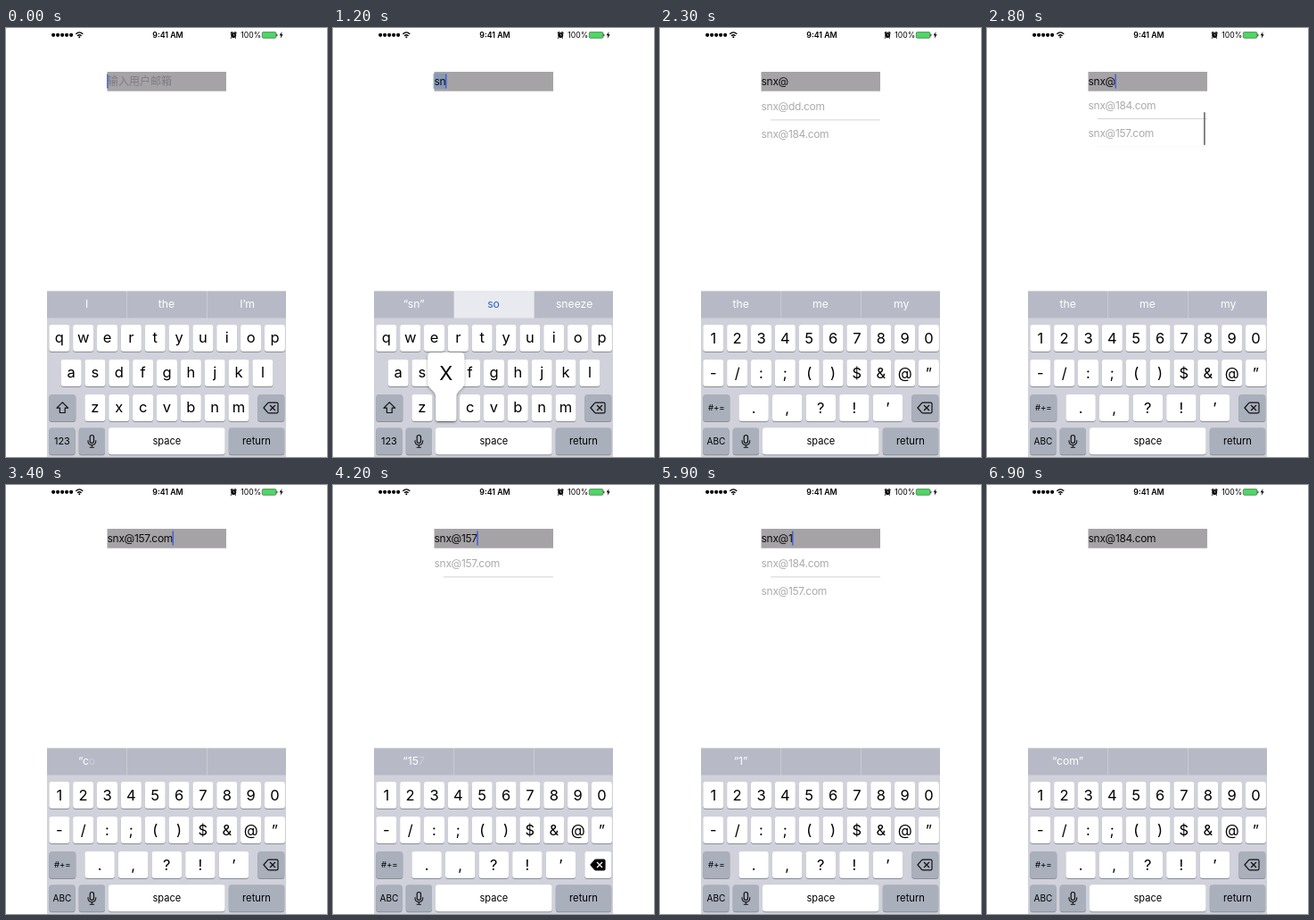
Animation of 360x480 px, one loop 7 s. Source, as an HTML page:

```html
<!DOCTYPE html>
<html lang="zh">
<head>
<meta charset="utf-8">
<title>Mail field suggestions</title>
<style>
html, body { margin: 0; width: 100%; height: 100%; overflow: hidden; background: #fff; }
svg { display: block; width: 100vw; height: 100vh; }
text { font-family: Inter, Roboto, sans-serif; white-space: pre; }
.mail { font-size: 12px; letter-spacing: -.32px; }
</style>
</head>
<body>
<svg id="stage" viewBox="0 0 360 480">
  <defs>
    <clipPath id="listClip"><rect x="110" y="71" width="140" height="61.5"/></clipPath>
    <filter id="soft" x="-30%" y="-30%" width="160%" height="160%">
      <feDropShadow dx="0" dy="1" stdDeviation="1.6" flood-color="#000" flood-opacity=".4"/>
    </filter>
  </defs>
  <rect width="360" height="480" fill="#fff"/>
  <g id="status"></g>
  <rect x="113.5" y="49" width="133.5" height="21.7" fill="#a5a3a6"/>
  <rect id="mark" x="112.5" y="51" height="17" fill="#7f95bb" opacity=".75"/>
  <text id="hint" x="114" y="63.6" font-size="12" fill="#7e7d83" style="font-family:'Noto Sans CJK SC','Noto Sans CJK',sans-serif">输入用户邮箱</text>
  <text id="field" class="mail" x="113.6" y="63.7" fill="#0c0c0e"></text>
  <rect id="caret" y="51.5" width="1.4" height="16" fill="#3c5ed8"/>
  <g clip-path="url(#listClip)"><g id="list"></g><rect id="bar" x="243" y="73.8" width="1.8" rx=".9" fill="#777"/></g>
  <rect x="46" y="294.5" width="268" height="185.5" fill="#d0d1da"/>
  <g id="hints"></g>
  <g id="letters"></g>
  <g id="symbols"></g>
  <g id="common"></g>
  <g id="press"></g>
</svg>
<script>
const $ = id => document.getElementById(id);
const LOOP = 7000, ROW = 31.5, VIEW = 61.5, STEP = 26.85, KEY = 23;
const WHITE = '#fff', GREY = '#a9afbb';
const USER = 'snx', MAILS = ['dd', '184', '157'].map(d => `${USER}@${d}.com`);

const esc = s => s.replace(/&/g, '&amp;');
const label = (x, y, s, size, extra = '') =>
  `<text x="${x}" y="${y}" font-size="${size}" text-anchor="middle" ${extra}>${esc(s)}</text>`;
const cap = (x, y, w, fill = WHITE) =>
  `<rect x="${x}" y="${y + 1}" width="${w}" height="30" rx="3.2" fill="#8b8e96"/>` +
  `<rect x="${x}" y="${y}" width="${w}" height="30" rx="3.2" fill="${fill}"/>`;
const key = (x, y, w, s, fill, size = 16.5, dy = 20.8) =>
  cap(x, y, w, fill) + label(x + w / 2, y + dy, s, size);
const row = (chars, x, y, dy, w = KEY, step = STEP) =>
  [...chars].map((c, i) => key(x + i * step, y, w, c, WHITE, 16.5, dy)).join('');

function eraser(down) {
  return cap(282.3, 410, 30, down ? WHITE : GREY) +
    `<path d="M289 425l4.6-5.3q.5-.6 1.3-.6h8.6q1.5 0 1.5 1.5v8.8q0 1.5-1.5 1.5h-8.6q-.8 0-1.3-.6z" fill="${down ? '#000' : 'none'}" stroke="#111" stroke-width="1.2" stroke-linejoin="round"/>` +
    `<path d="M296 422l6 6m0-6l-6 6" stroke="${down ? '#fff' : '#111'}" stroke-width="1.3"/>`;
}

function balloon(x, y, s) {
  const c = x + KEY / 2;
  return `<path filter="url(#soft)" fill="#fff" d="M${c - 16} ${y - 47}h32q4.5 0 4.5 4.5v30c0 6-9 8-9 15v24.500q0 3-3 3h-17q-3 0-3-3v-24.500c0-7-9-9-9-15v-30q0-4.500 4.500-4.500z"/>` +
    label(c, y - 16, s, 22);
}

function build() {
  $('status').innerHTML =
    [0, 1, 2, 3, 4].map(i => `<circle cx="${53.1 + i * 5}" cy="7.8" r="2.1"/>`).join('') +
    '<g fill="none" stroke="#000" stroke-width="1.3"><path d="M78.300 6.700q4-3.700 8 0"/><path d="M80 8.700q2.300-2 4.600 0"/></g><circle cx="82.300" cy="10.200" r="1"/>' +
    label(181.5, 10.9, '9:41 AM', 8.8, 'font-weight="600"') +
    '<circle cx="255.200" cy="8" r="3"/><path d="M251.900 6l2-1.800m4.600 1.800l-2-1.800m-3.700 6.500l-.8.800m4.900-.8l.8.800" stroke="#000" stroke-width="1.100"/><path d="M255.200 6.300v1.900h1.300" fill="none" stroke="#fff" stroke-width=".6"/>' +
    label(274.7, 11, '100%', 8.7) +
    '<rect x="287.300" y="4.600" width="15.600" height="6.700" rx="1.200" fill="#4cd964" stroke="#3c4a40" stroke-width=".6"/><path d="M303.800 6.800v2.400" stroke="#333" stroke-width="1.100"/><path d="M309.600 4l-3 4.300h1.800l-.7 3.400 3-4.500h-1.900z"/>';

  $('letters').innerHTML = row('qwertyuiop', 48.3, 332, 19.7) + row('asdfghjkl', 61.6, 371, 19.7) +
    row('zxcvbnm', 88.4, 410, 19.7) + cap(48.3, 410, 30, GREY) +
    '<path d="M63.300 418.800l6.300 6.400h-3.400v5.300h-5.800v-5.300h-3.400z" fill="none" stroke="#111" stroke-width="1.200" stroke-linejoin="round"/>';
  $('symbols').innerHTML = row('1234567890', 48.3, 332, 20.9) + row('-/:;()$&@”', 48.3, 371, 20.7) +
    row('.,?!’', 88.4, 410, 20.7, 33.4, 37.6) + key(48.3, 410, 30, '#+=', GREY, 9.6, 18.4);
  $('common').innerHTML = cap(81.7, 447.3, 29.3, GREY) +
    '<rect x="94.200" y="455.500" width="4.300" height="8.800" rx="2.150" fill="none" stroke="#111" stroke-width="1.200"/><path d="M92 461.300v1q0 4.200 4.350 4.200t4.350-4.200v-1m-4.350 5.200v2.800m-2.600 0h5.200" fill="none" stroke="#111" stroke-width="1.100"/>' +
    key(115, 447.3, 130.6, 'space', WHITE, 11.1, 18.4) +
    key(249.8, 447.3, 62.4, 'return', GREY, 11.2, 18.4);
}

// [time, text]
const EDITS = [[0, ''], [600, 's'], [1000, 'sn'], [1300, USER], [1700, USER + '@'], [3100, MAILS[2]],
  [3600, MAILS[2].slice(0, 10)], [3750, MAILS[2].slice(0, 9)], [3900, MAILS[2].slice(0, 8)],
  [4050, MAILS[2].slice(0, 7)], [4300, MAILS[2].slice(0, 6)], [4500, MAILS[2].slice(0, 5)], [6200, MAILS[1]]];
// [time, three words, reveal time]
const WORDS = [[0, ['I', 'the', 'I’m'], 0], [600, ['“s”', 'so', 'she'], 0], [1000, ['“sn”', 'so', 'sneeze'], 0],
  [1300, ['“snx”', 'sax', 'six'], 0], [1700, ['the', 'me', 'my'], 0], [3200, ['“com”', '', ''], 400],
  [3700, ['“co”', '', ''], 0], [3850, ['“c”', '', ''], 0], [4000, ['“157”', '', ''], 280],
  [4300, ['“15”', '', ''], 0], [4500, ['“1”', '', ''], 0], [6300, ['“com”', '', ''], 400]];
// [from, to, key x, key y, sign]
const TAPS = [[500, 600, 61.6 + STEP, 371, 'S'], [900, 1000, 88.4 + STEP * 5, 410, 'N'],
  [1100, 1300, 88.4 + STEP, 410, 'X'], [1600, 1700, 48.3 + STEP * 8, 371, '@']];

const latest = (table, t) => table.filter(e => e[0] <= t).pop();
const ease = (t, a, b) => { const p = Math.min(1, Math.max(0, (t - a) / (b - a))); return 1 - (1 - p) ** 3; };
const show = (id, on) => $(id).setAttribute('visibility', on ? 'visible' : 'hidden');
const put = (id, html) => { const el = $(id); if (el.last !== html) el.innerHTML = el.last = html; };

function drawWords(t) {
  const [start, words, span] = latest(WORDS, t);
  const p = span ? Math.min(1, (t - start + 1) / span) : 1;
  const picked = t >= 1000 && t < 1300;
  put('hints', words.map((w, i) => {
    const x = 46 + i * 90, on = picked && i === 1;
    const n = Math.ceil(p * w.length);
    const body = p < 1 ? `${w.slice(0, n - 1)}<tspan opacity=".5" fill-opacity=".5">${w.slice(n - 1, n)}</tspan>` : w;
    return `<rect x="${x}" y="294.500" width="${i === 2 ? 88 : 89.3}" height="30" fill="${on ? '#e8eaf0' : '#b7bac6'}"/>` +
      `<text x="${x + (i === 1 ? 44 : 44.6)}" y="313.200" font-size="12.200" text-anchor="middle" fill="${on ? '#2b64c4' : '#fff'}">${body}</text>`;
  }).join(''));
}

function drawList(t, text) {
  const open = text.includes('@') && !text.endsWith('.com') && t < 6200;
  const hits = open ? MAILS.filter(m => m.startsWith(text)) : [];
  const first = t < 3100;
  const pull = 12 * (ease(t, 4900, 5200) - ease(t, 5200, 5600));
  const off = first ? -(ROW * 3 - VIEW) * ease(t, 2400, 2900) : pull;
  put('list', hits.map((m, i) => {
    const y = 71 + i * ROW + off;
    return `<text class="mail" x="113.600" y="${y + 20.8}" fill="#aaaaad">${m}</text>` +
      `<rect x="124" y="${y + 31.5}" width="123" height=".8" fill="#c9c9cd"/>`;
  }).join(''));
  const sliding = open && (first ? t > 2400 && t < 3100 : t > 4900 && t < 5700);
  show('bar', sliding);
  $('bar').setAttribute('height', first ? 37 : Math.max(8, 55 - pull * 3.4));
  $('bar').setAttribute('y', first ? 73.8 - off * .62 : 73.8);
}

function draw(t) {
  const [edited, text] = latest(EDITS, t);
  $('field').textContent = text;
  const end = 113.6 + (text ? $('field').getComputedTextLength() : 0);
  show('hint', !text);
  show('mark', t >= 1000 && t < 1300);
  $('mark').setAttribute('width', Math.max(0, end - 111.5));
  $('caret').setAttribute('x', end - .4);
  show('caret', (t - edited) % 1000 < 500);
  drawList(t, text);
  drawWords(t);

  const digits = t >= 1500;
  show('letters', !digits);
  show('symbols', digits);
  const erasing = t >= 3500 && t < 4600 && t % 300 < 200;
  const tap = TAPS.find(k => t >= k[0] && t < k[1]);
  put('press', eraser(erasing) +
    key(48.3, 447.3, 29.3, digits ? 'ABC' : '123', t >= 1400 && t < 1600 ? WHITE : GREY, digits ? 10 : 10.9, 18.4) +
    (tap ? balloon(...tap.slice(2)) : ''));
}

build();
const began = performance.now();
function tick() {
  const t = (performance.now() - began) % LOOP;
  draw(Math.floor(t / 100) * 100);
  requestAnimationFrame(tick);
}
tick();
</script>
</body>
</html>
```
